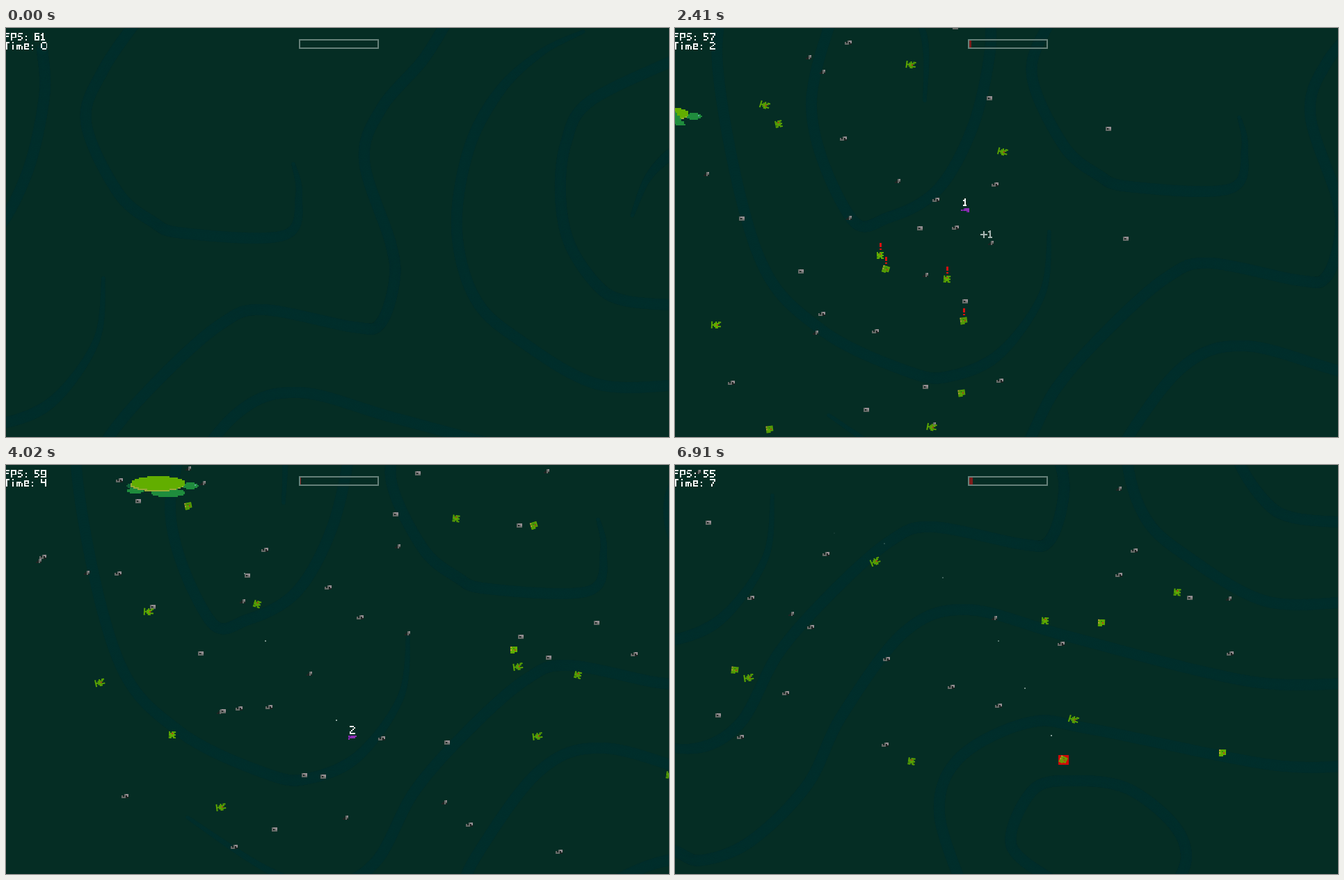
An HTML page with a canvas that plays this animation: 953x588 px, repeating every 7.01 s.

```html
<!DOCTYPE html>
<html lang="en">
<head>
<meta charset="utf-8">
<title>Swamp chase</title>
<style>
html, body { margin: 0; width: 100%; height: 100%; overflow: hidden; background: #052d24; }
canvas { display: block; width: 953px; height: 588px; }
</style>
</head>
<body>
<canvas id="stage" width="953" height="588"></canvas>
<script>
const W = 953, H = 588, LOOP = 7010, STEP = 62.5, PX = 1.86;
const ctx = document.getElementById("stage").getContext("2d");
const lerp = (a, b, u) => a + (b - a) * u;
const clamp = (v, lo, hi) => Math.max(lo, Math.min(hi, v));

let seed = 23;
const rand = () => (seed = (seed * 16807) % 2147483647) / 2147483647;

// ---- contour map, in world coordinates ----
const MAP_X = -490, MAP_Y = -60;
const map = document.createElement("canvas");
map.width = 1560;
map.height = 1040;
const ink = map.getContext("2d");
ink.translate(-MAP_X, -MAP_Y);
ink.fillStyle = "#002e2b";

function spline(a, b, c, d, u) {
  return b + u / 2 * (c - a + u * (2 * a - 5 * b + 4 * c - d + u * (3 * (b - c) + d - a)));
}

// thinA and thinB taper the first and last end
function contour(thinA, thinB, p) {
  const n = p.length / 2;
  const at = (i, k) => p[2 * clamp(i, 0, n - 1) + k];
  for (let i = 0; i < n - 1; i++) {
    for (let s = 0; s < 80; s++) {
      const u = s / 80, d = i + u;
      const [x, y] = [0, 1].map(k => spline(at(i - 1, k), at(i, k), at(i + 1, k), at(i + 2, k), u));
      let r = 8;
      if (thinA) r = Math.min(r, 2.5 + d * 2.4);
      if (thinB) r = Math.min(r, 2.5 + (n - 1 - d) * 2.4);
      ink.beginPath();
      ink.arc(x, y, r, 0, 7);
      ink.fill();
    }
  }
}

contour(0, 1, [-312, -30, -337, 119, -280, 389, -190, 499, -60, 562, 0, 567, 70, 534, 130, 449, 140, 359]);
contour(0, 0, [-150, -10, -202, 179, -146, 339, -90, 339, -20, 299, 30, 209, 55, 99, 52, 30]);
contour(1, 1, [-80, -5, -40, 79, -39, 172]);
contour(0, 1, [195, -20, 140, 60, 115, 135, 160, 235, 210, 278, 255, 295, 400, 298, 421, 240, 413, 195]);
contour(0, 1, [640, -20, 600, 45, 540, 115, 515, 190, 553, 310, 558, 365, 538, 425, 500, 430,
  370, 405, 310, 425, 230, 495, 150, 585, 93, 688, 23, 724, -60, 700, -178, 623]);
contour(0, 0, [-300, 790, -187, 766, -90, 826, 0, 871, 40, 884, 110, 856, 190, 776, 240, 676, 330, 556,
  420, 524, 560, 561, 750, 611, 860, 631, 970, 630]);
contour(0, 0, [420, 940, 380, 816, 410, 736, 510, 686, 600, 696, 850, 746, 970, 749]);
contour(0, 0, [540, 912, 483, 861, 515, 783, 575, 770, 650, 781, 715, 831, 735, 880, 715, 930]);
contour(1, 0, [830, 5, 770, 35, 710, 90, 665, 175, 648, 290, 675, 390, 740, 450, 850, 512, 970, 513]);
contour(0, 0, [970, 42, 840, 105, 805, 165, 797, 240, 810, 310, 850, 370, 890, 392, 970, 399]);
contour(0, 1, [970, 172, 945, 190, 920, 220, 900, 270]);

// ---- player path: time, x, y ----
const PATH = [
  [50, 60, 330], [1500, 76, 350], [1880, 62, 412], [2250, 45, 345], [2910, -75, 271], [3150, -109, 307],
  [3550, -72, 390], [4020, 60, 509], [5020, 255, 497], [5400, 339, 515], [5780, 437, 596], [6850, 558, 740]
];
const before = (list, t) => {
  let i = 0;
  while (i < list.length - 2 && t >= list[i + 1][0]) i++;
  return i;
};
function player(t) {
  const i = before(PATH, t), a = PATH[i], b = PATH[i + 1];
  const u = clamp((t - a[0]) / (b[0] - a[0]), 0, 1);
  return [lerp(a[1], b[1], u), lerp(a[2], b[2], u)];
}

// ---- camera easing after the player: time, x, y ----
const CAMERA = [
  [50, 0, 0], [760, 258, -22], [1880, 390, -86], [2910, 440, -19],
  [4020, 438, -117], [5020, 337, -188], [5970, 147, -236], [6910, 0, -316]
];
function camera(t) {
  const i = before(CAMERA, t), a = CAMERA[i], b = CAMERA[i + 1];
  const d = (b[0] - a[0]) / 1000, u = clamp((t - a[0]) / 1000 / d, 0, 1);
  return [1, 2].map(k => {
    const pull = c => 1.5 * d * ([476, 294][k - 1] - player(c[0])[k - 1] - c[k]);
    return (2 * u ** 3 - 3 * u * u + 1) * a[k] + (u ** 3 - 2 * u * u + u) * pull(a)
      + (3 * u * u - 2 * u ** 3) * b[k] + (u ** 3 - u * u) * pull(b);
  });
}

// The picture advances in even ticks between camera beats.
function snap(ms) {
  const i = before(CAMERA, ms), from = CAMERA[i][0], span = CAMERA[i + 1][0] - from;
  const ticks = Math.round(span / STEP);
  return from + clamp(Math.floor((ms - from) / span * ticks + 1e-6), 0, ticks) / ticks * span;
}

// ---- crowd: everything drifts steadily, new arrivals spread from the left ----
function arrival(born, life, speed) {
  const [cx, cy] = camera(born);
  const reach = Math.min(W, 0.27 * born + 110);
  return {
    born, life, ref: born,
    x: reach * rand() ** 1.25 - cx, y: 10 + (H - 20) * rand() - cy,
    vx: speed * (0.4 + rand()), vy: speed * (rand() - 0.6), kind: Math.floor(rand() * 4) % 3
  };
}
const litter = Array.from({ length: 84 }, (_, i) => arrival(130 + 78 * i, 3300, 40));

// a known place and velocity: time, x, y, x and y per second
const hunters = [
  [1880, -25, 190, 191, 107], [1880, -72, 514, 173, -50], [1880, -228, 398, 243, -7], [1880, -144, 96, 165, 46],
  [2910, 113, 565, 192, -52], [2910, -226, 196, 45, -18], [2910, -208, 222, 118, 86],
  [4020, -303, 430, 125, -57], [5020, 25, 496, 311, 25], [5020, 145, 498, 205, 22], [5020, 195, 416, 200, 141],
  [5020, -326, 513, 218, 52], [5020, -27, 625, 194, 62], [5020, -287, 751, 208, -68], [5970, 415, 549, 152, 203]
].map(([ref, x, y, vx, vy]) => ({ ref, born: ref - 900, life: 4900, x, y, vx, vy }));
const strays = Array.from({ length: 13 }, (_, i) => arrival(500 + 470 * i, 2400, 80));
const frogs = [...hunters, ...strays];

function drawCrowd(list, t, paint) {
  list.forEach((o, i) => {
    const age = (t - o.ref) / 1000;
    if (t >= o.born && t < o.born + o.life) paint(o, o.x + o.vx * age, o.y + o.vy * age, i);
  });
}

// ---- pixel art ----
const COLORS = {
  "#": "#f4f8f6", g: "#666b68", l: "#968f93", k: "#1d2422", G: "#62ae00", d: "#3d8a0c",
  r: "#c2391b", y: "#c4a33c", P: "#8e2fb4", p: "#642493"
};
const LITTER = ["..gll/gkgkl/gggkk", "glll/gkgl/gggg", "..gl/.kgg/kkgk"];
const FROGS = ["yGGGG/GGdGG/yGGrG/GGGGG/GGG..", "G.GGG/GGrG./GGGGG/dGGG./GG.GG", "G..G.GG/G.GGGG./GGGGr../G.GGGGG/G..GG.."];
const HERO = ["pPp..P/PPpPPP/...p.P", "..pPPP/PpPPPP/....pP", "PpPPPP/pPPPP./P....."];
const FONT = {
  F: "####/#.../###./#.../#.../#...", P: "####/#..#/#..#/####/#.../#...", S: ".###/#.../###./...#/...#/###.",
  T: "####/.#../.#../.#../.#../.#..", i: ".#./.../.#./.#./.#./.#.", m: "...../...../####./#.#.#/#.#.#/#.#.#",
  e: "..../####/#..#/####/#.../####", ":": "..././.#./..././.#./...", " ": "...", "+": "...../..#../..#../#####/..#../..#..",
  0: ".###./#...#/#...#/#...#/#...#/.###.", 1: ".#./##./.#./.#./.#./###", 2: "###./...#/..#./.#../#.../####",
  3: "###./...#/.##./...#/...#/###.", 4: "#..#/#..#/####/...#/...#/...#", 5: "####/#.../###./...#/...#/###.",
  6: "####/#.../####/#..#/#..#/####", 7: "####/...#/..#./..#./.#../.#..", 8: "####/#..#/.##./#..#/#..#/####",
  9: "####/#..#/#..#/####/...#/####"
};

function rect(color, x, y, w, h) {
  ctx.fillStyle = color;
  ctx.fillRect(x, y, w, h);
}
// cell edges are rounded so that neighbours always meet
function pixels(art, x, y) {
  art.split("/").forEach((row, j) => [...row].forEach((c, i) => {
    if (c === ".") return;
    const [l, r] = [i, i + 1].map(n => Math.round(x + n * PX));
    const [t, b] = [j, j + 1].map(n => Math.round(y + n * PX));
    rect(COLORS[c], l, t, r - l, b - t);
  }));
}
function centered(art, x, y, turn = 0) {
  const rows = art.split("/");
  ctx.save();
  ctx.translate(Math.round(x), Math.round(y));
  ctx.rotate(turn);
  pixels(art, -rows[0].length * PX / 2, -rows.length * PX / 2);
  ctx.restore();
}
const advance = c => (FONT[c].split("/")[0].length + 1) * PX;
function write(text, x, y) {
  for (const c of text) {
    pixels(FONT[c], x, y);
    x += advance(c);
  }
}
function writeCentered(text, x, y) {
  const w = [...text].reduce((sum, c) => sum + advance(c), -PX);
  write(text, x - w / 2, y - 3 * PX);
}
function blob(color, x, y, rx, ry) {
  for (let j = -ry; j < ry; j += 2) {
    const w = Math.round(rx * Math.sqrt(1 - ((j + 1) / ry) ** 2) / 2) * 2;
    rect(color, x - w, y + j, 2 * w, 2);
  }
}

function drawTurtle(t) {
  const u = (t - 2910) / 1110, green = "#1f8c3d";
  const low = Math.abs(Math.floor((t - 2910) / 370)) % 2;
  ctx.save();
  ctx.translate(Math.round(-348 + 135 * u), Math.round(179 - 32 * u));
  blob("#12653a", -46, 0, 6, 3);
  blob(green, -39, 7, 12, 4);
  blob(green, 40, 0, 11, 5);
  rect("#5fa79c", 46, -2, 2, 2);
  if (low) blob(green, 8, 10, 25, 6);
  blob("#98ad35", -8, -1, 38, 9);
  blob("#62ae00", -6, -4, 39, 10);
  if (!low) for (let j = 0; j < 12; j++) rect(green, -14 + 2 * Math.round(1.3 * j), -11 + 2 * j, 24 - 2 * Math.floor(j / 2), 2);
  ctx.restore();
}

// ---- events ----
const POINTS = [2150, 2600, 4250, 5770], DEATH = 6850;

function drawHero(t) {
  if (t <= 50 || t >= DEATH) return;
  const [x, y] = player(t), score = POINTS.filter(p => t >= p).length;
  centered(HERO[Math.floor(t / 340) % 3], x, y);
  writeCentered(String(score), x, y - 11);
  if (score < 3) return;
  const turn = lerp(-2.9, -Math.PI / 2, clamp((t - 5020) / 950, 0, 1));
  ctx.save();
  ctx.translate(x + 8 * Math.cos(turn), y - 11 + 8 * Math.sin(turn));
  ctx.rotate(turn);
  ctx.fillStyle = COLORS["#"];
  ctx.beginPath();
  ctx.moveTo(3, 0);
  ctx.lineTo(-3, -4);
  ctx.lineTo(-3, 4);
  ctx.fill();
  ctx.restore();
}

function drawEffects(t) {
  for (let born = 3150; born <= Math.min(t, DEATH); born += 390) {
    const age = (t - born) / 1000, [x, y] = player(born);
    ctx.globalAlpha = 0.75 * Math.max(0, 1 - age / 2.4);
    rect("#c8dcd6", Math.round(x + 15 * age), Math.round(y - 40 * age), 2, 2);
  }
  for (const born of POINTS) {
    const age = t - born;
    if (age < 0 || age > 750) continue;
    const [x, y] = player(born);
    ctx.globalAlpha = 1 - age / 750;
    writeCentered("+1", x, y);
  }
  ctx.globalAlpha = 1;
}

function drawFrog(t, frog, x, y, i) {
  const [px, py] = player(t), ahead = px - x;
  centered(FROGS[(Math.floor(t / 140) + i) % 3], x, y, Math.atan2(frog.vy, frog.vx) / 2);
  if (t < DEATH && ahead > 0 && Math.hypot(ahead, py - y) < 172) {
    rect("#d81010", Math.round(x) - 1, Math.round(y) - 18, 3, 6);
    rect("#d81010", Math.round(x) - 1, Math.round(y) - 10, 3, 2);
  }
}

function drawHud(t) {
  const recent = [...POINTS, DEATH].filter(p => t >= p && t - p < 1200).length;
  const second = Math.floor((t + 120) / 1000);
  if (t >= POINTS[0]) rect("#7d1d1b", 423, 18, 1 + 2 * recent, 10);
  ctx.strokeStyle = "#658079";
  ctx.lineWidth = 2;
  ctx.strokeRect(422, 17, 113, 12);
  write("FPS: " + [61, 60, 57, 58, 59, 59, 58, 55][second], -2, 7);
  write("Time: " + second, -2, 20);
}

function draw(ms) {
  const t = snap(ms);
  const [cx, cy] = camera(t).map(Math.round);
  rect("#052d24", 0, 0, W, H);
  ctx.save();
  ctx.translate(cx, cy);
  ctx.drawImage(map, MAP_X, MAP_Y);
  drawCrowd(litter, t, (o, x, y) => centered(LITTER[o.kind], x, y));
  drawEffects(t);
  if (t > 50) drawTurtle(t);
  if (t >= DEATH) rect("#d00808", 551, 733, 15, 14);
  drawCrowd(frogs, t, (o, x, y, i) => drawFrog(t, o, x, y, i));
  drawHero(t);
  ctx.restore();
  drawHud(t);
}

const start = performance.now();
function tick() {
  draw((performance.now() - start) % LOOP);
  requestAnimationFrame(tick);
}
tick();
</script>
</body>
</html>
```
